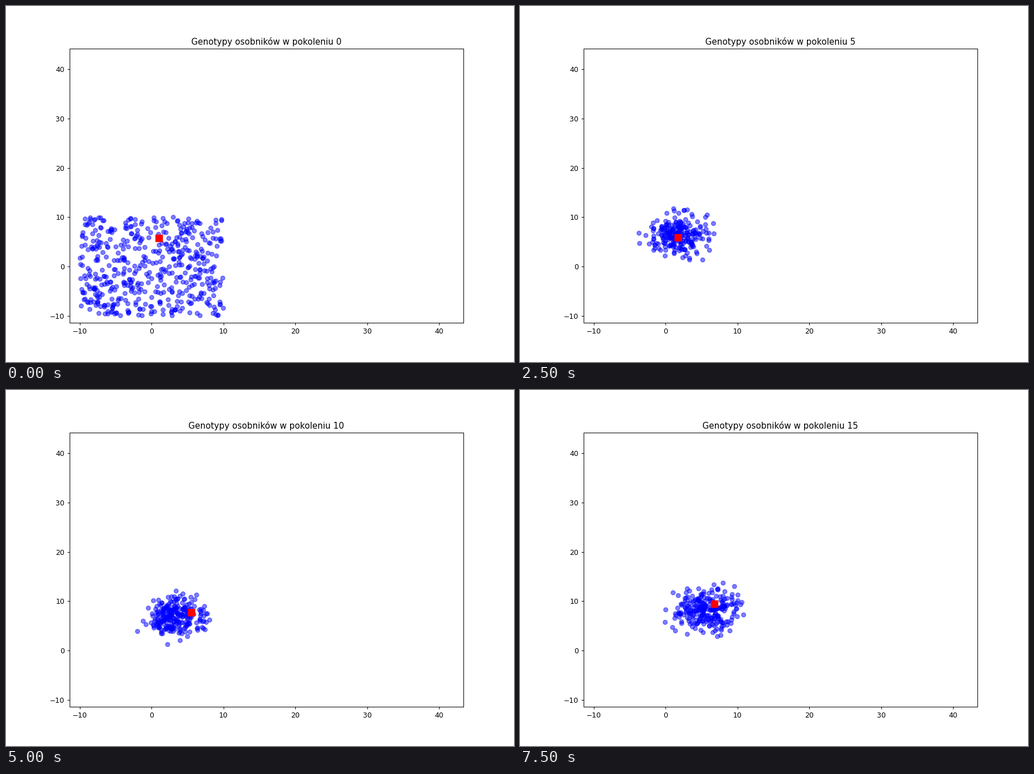
Write a matplotlib script that moves like this. It is 894 by 626 pixels and loops after 8 s.

```python
import numpy as np
import matplotlib.pyplot as plt
from matplotlib.animation import FuncAnimation

GENERATIONS = 16
STEP_MS = 500
START_SIZE = 500
MAX_RADIUS = 3.0

# Key points of the best individual: generation, x, y
BEST_PATH = np.array([(0, 1.03, 5.74), (3, 1.82, 5.78), (5, 1.74, 5.87), (7, 2.85, 6.43),
                      (10, 5.46, 7.77), (13, 6.17, 8.55), (15, 6.76, 9.45)])


def best_at(gen):
    gens, xs, ys = BEST_PATH.T
    return np.interp(gen, gens, xs), np.interp(gen, gens, ys)


def population(gen):
    """Uniform start, then a bell-shaped cloud that widens and drifts up right."""
    rng = np.random.default_rng(40 + gen)
    if gen == 0:
        return rng.uniform(-10, 10, (START_SIZE, 2))
    settle = np.exp((1 - gen) / 2.5)
    count = int(275 - 140 * settle)
    spread = 2.1 - 0.7 * settle
    center = np.array([1.9 + 0.45 * max(0, gen - 7), 6.2 + 0.33 * max(0, gen - 8.5)])
    cloud = rng.normal(size=(count, 2))
    cloud = cloud[np.hypot(*cloud.T) < MAX_RADIUS]
    return center + spread * cloud


populations = [population(g) for g in range(GENERATIONS)]

fig, ax = plt.subplots(figsize=(10, 7.0023), dpi=89.4)  # 894 x 626 px
ax.set_xlim(-11.44, 43.33)
ax.set_ylim(-11.45, 44.2)
dots = ax.scatter([], [], color="blue", alpha=0.5)
best = ax.scatter([], [], color="red", marker="s", s=100)
title = ax.set_title("")


def update(gen):
    dots.set_offsets(populations[gen])
    best.set_offsets([best_at(gen)])
    title.set_text(f"Genotypy osobników w pokoleniu {gen}")
    return dots, best, title


anim = FuncAnimation(fig, update, frames=GENERATIONS, interval=STEP_MS,
                     repeat=True, repeat_delay=0)
plt.show()
```
